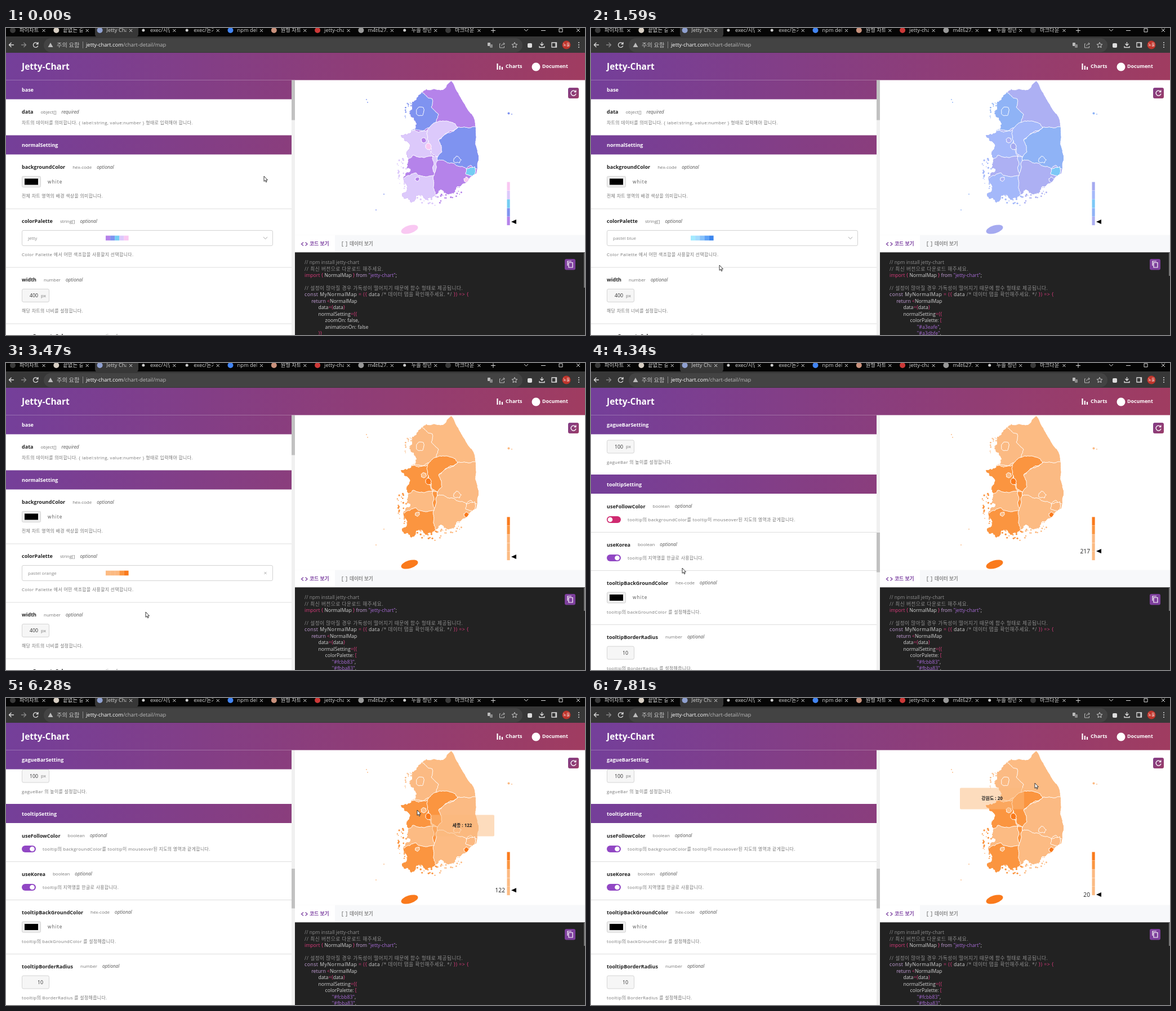
Recreate the animation shown at these times as an HTML page with a canvas. Size 1028 by 545 pixels, loop 8000 ms.

```html
<!DOCTYPE html>
<html lang="ko">
<head>
<meta charset="utf-8">
<title>Jetty-Chart</title>
<style>
html, body { margin: 0; width: 100%; height: 100%; overflow: hidden; background: #fff; }
canvas { display: block; }
</style>
</head>
<body>
<canvas id="stage" width="1028" height="545"></canvas>
<script>
const ctx = document.getElementById('stage').getContext('2d');
const LOOP = 8000;
const FONT = "'Open Sans', 'Noto Sans CJK KR', 'Noto Sans CJK', sans-serif";

// ---------- drawing helpers ----------
function text(str, x, y, size, color, style = '', spacing = 0, align = 'left') {
  ctx.font = `${style} ${size}px ${FONT}`;
  ctx.letterSpacing = spacing + 'px';
  ctx.textAlign = align;
  ctx.fillStyle = color;
  ctx.fillText(str, x, y + size * 0.36);
  return ctx.measureText(str).width;
}
function rect(x, y, w, h, fill, radius = 0, border) {
  ctx.beginPath();
  ctx.roundRect(x, y, w, h, radius);
  ctx.fillStyle = fill;
  ctx.fill();
  if (border) { ctx.strokeStyle = border; ctx.lineWidth = 1; ctx.stroke(); }
}
function circle(x, y, r, fill) {
  ctx.beginPath();
  ctx.arc(x, y, r, 0, 7);
  ctx.fillStyle = fill;
  ctx.fill();
}
function line(path, color, width = 1) {
  ctx.strokeStyle = color;
  ctx.lineWidth = width;
  ctx.stroke(new Path2D(path));
}
function shape(path, fill) {
  ctx.fillStyle = fill;
  ctx.fill(new Path2D(path));
}
function clipped(path, draw) {
  ctx.save();
  ctx.clip(new Path2D(path));
  draw();
  ctx.restore();
}
function gradient(x0, y0, x1, y1) {
  const g = ctx.createLinearGradient(x0, y0, x1, y1);
  g.addColorStop(0, '#743f9a');
  g.addColorStop(1, '#a03c60');
  return g;
}
const brand = gradient(0, 50, 1028, 150);
const clamp = v => Math.max(0, Math.min(1, v));
const smooth = v => (v = clamp(v), v * v * (3 - 2 * v));
const latest = (list, t) => list.findLast(item => item.at <= t);

// ---------- timeline ----------
const MOVE_TIME = 260, FADE = 320;
const PAGE_JUMP = 3980, SCROLL_AT = 4360, TOGGLE_AT = 4960;
const MOVES = [
  { at: -MOVE_TIME, to: [458, 263], value: 85 },
  { at: 100, to: [320, 368] },
  { at: 670, to: [211, 399] },
  { at: 1100, to: [228, 421] },
  { at: 1700, to: [262, 368] },
  { at: 2300, to: [255, 424] },
  { at: 2650, to: [248, 442] },
  { at: 3940, to: [162, 364], value: 217 },
  { at: 4700, to: [42, 264] },
  { at: 5150, to: [790, 200], place: '경상북도', value: 87 },
  { at: 5700, to: [730, 199], place: '세종', value: 122 },
  { at: 6440, to: [727, 201], place: '충청남도', value: 590 },
  { at: 6950, to: [770, 108], place: '경기도', value: 200 },
  { at: 7500, to: [788, 151], place: '강원도', value: 20 }
];
const PICKS = [{ at: 0, palette: 0 }, { at: 1450, palette: 1 }, { at: 3070, palette: 2 }];
const isOpen = t => (t > 760 && t < 1590) || (t > 2270 && t < 3130);

function cursorAt(t) {
  const i = MOVES.findLastIndex(move => move.at <= t);
  const from = MOVES[Math.max(0, i - 1)].to, k = smooth((t - MOVES[i].at) / MOVE_TIME);
  return MOVES[i].to.map((v, axis) => from[axis] + (v - from[axis]) * k);
}
const scrollAt = t => 10 * clamp((t - SCROLL_AT) / 190);

// ---------- palettes ----------
function mix(a, b, k) {
  const channel = (hex, i) => parseInt(hex.slice(i, i + 2), 16);
  return `rgb(${[1, 3, 5].map(i => channel(a, i) * (1 - k) + channel(b, i) * k)})`;
}
const ramp = (a, b) => Array.from({ length: 5 }, (_, i) => mix(a, b, i / 4));
const PALETTES = [
  { name: 'jetty', colors: ['#b583ea', '#7f93f0', '#74cdf3', '#dcc9fb', '#f9c8f2'] },
  { name: 'pastel blue', colors: ['#a3eafe', '#a3dbfe', '#86c1fb', '#5ea3f8', '#3b85ee'] },
  { name: 'pastel orange', colors: ['#fcbb83', '#fbba83', '#fcb981', '#fb9540', '#fa7a1c'] },
  { name: 'pastel vermilion', colors: ramp('#fbe6dc', '#ea4335') },
  { name: 'lightgrey', colors: ramp('#f5f7f8', '#64748b') },
  { name: 'pastel green', colors: ramp('#d5f5ec', '#2fc46f') }
];
function mapColors(t) {
  const { at, palette } = latest(PICKS, t);
  const before = PALETTES[Math.max(0, palette - 1)].colors;
  return PALETTES[palette].colors.map((c, i) => mix(before[i], c, clamp((t - at) / FADE)));
}
function swatches(palette, x, y) {
  palette.colors.forEach((c, i) => rect(x + i * 8.1, y - 4.3, 8.2, 8.6, c));
}

// ---------- map ----------
const noise = (x, y) => {
  const s = Math.sin(x * 12.9898 + y * 78.233) * 43758.5453;
  return s - Math.floor(s) - 0.5;
};
const points = list => list.split(' ').map(p => p.split(',').map(Number));

// Midpoint displacement turns a few key points into a ragged border.
function ragged(keys, roughness) {
  const out = [];
  const split = (a, b) => {
    const dx = b[0] - a[0], dy = b[1] - a[1];
    if (Math.hypot(dx, dy) < 2.5) return out.push(a);
    const mx = (a[0] + b[0]) / 2, my = (a[1] + b[1]) / 2;
    const k = noise(mx, my) * roughness(mx, my);
    const mid = [mx - dy * k, my + dx * k];
    split(a, mid);
    split(mid, b);
  };
  keys.forEach((p, i) => split(p, keys[(i + 1) % keys.length]));
  return 'M' + out.join('L') + 'Z';
}
const blob = (x, y, r) => Array.from({ length: 7 }, (_, i) => {
  const radius = r * (1 + noise(x + i, y) * 0.5), angle = i * Math.PI * 2 / 7;
  return [x + radius * Math.cos(angle), y + radius * Math.sin(angle)];
});
// The east coast is smooth, the west and south coasts are ragged.
const coastRoughness = (x, y) => 0.15 + 0.5 * clamp((790 - x + Math.max(0, y - 260) * 3) / 70);
const inland = () => 0.3;

const COAST = ragged(points('790,94 806,122 830,158 834,190 833,206 839,228 835,258 824,265 816,275 803,281 797,291 ' +
  '768,289 740,298 718,309 706,302 713,284 706,272 718,254 712,242 716,214 701,190 720,181 727,165 721,140 738,114 776,110'),
  coastRoughness);
// Gangwon is the ground colour; provinces are painted over it and cut off at the coast.
const PROVINCES = [
  { level: 3, keys: points('680,230 768,230 768,330 680,330') },
  { level: 0, keys: points('680,210 766,210 764,262 740,263 728,257 680,264') },
  { level: 0, keys: points('766,225 860,225 860,310 766,310 760,262') },
  { level: 1, keys: points('803,176 860,190 860,246 826,244 817,250 795,240 766,235 768,199 785,186') },
  { level: 3, keys: points('680,181 750,181 758,228 722,226 680,240') },
  { level: 1, keys: points('700,100 738,113 757,126 755,140 768,154 764,166 742,182 700,178') },
  { level: 3, keys: points('748,182 757,171 790,167 802,176 777,191 768,199 774,220 766,229 757,224') },
  { level: 1, keys: blob(735, 149, 8) },
  { level: 0, keys: blob(742, 200, 5) },
  { level: 4, keys: blob(750, 210, 6) },
  { level: 1, keys: blob(801, 234, 6) },
  { level: 2, keys: blob(826, 254, 9) },
  { level: 4, keys: blob(818, 270, 5) },
  { level: 0, keys: blob(731, 268, 4) }
].map(({ level, keys }) => ({ level, path: new Path2D(ragged(keys, inland)) }));

function drawIslands(colors) {
  for (let i = 0; i < 80; i++) {
    const angle = Math.PI * (0.2 + 0.9 * i / 80), radius = 58 + noise(i, 3) * 18;
    const x = 760 + radius * Math.cos(angle), y = 248 + radius * Math.sin(angle);
    circle(x, y, 1.2 + noise(i, 5), colors[x > 766 ? 0 : 3]);
  }
  for (let i = 0; i < 14; i++)
    circle(714 + noise(i, 7) * 12, 146 + noise(i, 8) * 28, 1 + noise(i, 9), colors[1]);
  for (const [x, y] of points('640,127 642,132 898,153 671,295 657,323')) circle(x, y, 0.9, colors[1]);
  circle(892.5, 151.5, 2, colors[1]);
  ctx.beginPath();
  ctx.ellipse(716.5, 357.5, 15.5, 7, -0.3, 0, 7);
  ctx.fillStyle = colors[4];
  ctx.fill();
}
function drawMap(t) {
  const colors = mapColors(t);
  drawIslands(colors);
  clipped(COAST, () => {
    rect(680, 90, 180, 230, colors[0]);
    for (const { level, path } of PROVINCES) {
      ctx.fillStyle = colors[level];
      ctx.fill(path);
      ctx.strokeStyle = '#fff';
      ctx.lineWidth = 1;
      ctx.stroke(path);
    }
  });
  colors.forEach((c, i) => rect(889.5, 335 - i * 15.4, 5.2, 15.1, c));
  drawHover(t);
}
function drawHover(t) {
  const { at, place, value } = latest(MOVES.filter(move => move.value), t - MOVE_TIME);
  const y = 350.5 - value * 0.076;
  shape(`M897 ${y}l9 -4v8z`, '#000');
  if (at > 0) text(value, 886, y, 10.2, '#222', '', 0, 'right');
  if (!place) return;
  const [cx, cy] = cursorAt(t);
  const x = cx < 765 ? cx + 23 : cx - 133, top = cy + 8.5;
  rect(x, top, 114, 38, 'rgba(251,186,125,.5)', 2);
  text(`${place} : ${value}`, x + 57, top + 19, 8, '#222', 'bold', 0, 'center');
}

// ---------- browser bar ----------
const TABS = [
  ['#3a3a3a', '파이차트'], ['#d8cfc4', '끝없는 길'], ['#8fa0d0', 'Jetty Char'], ['#ccc', 'exec/시연'],
  ['#ccc', 'exec/돈가'], ['#4285f4', 'npm deb'], ['#c9917c', '원형 차트'], ['#cb3837', 'jetty-char'],
  ['#999', 'm4t627.p'], ['#ccc', '누솔 청년'], ['#3a3a3a', '마크다운']
];
function drawBrowser() {
  rect(0, 0, 1028, 44, '#373737');
  rect(0, 0, 1028, 15, '#050505');
  rect(158, -6, 77, 22, '#373737', 5);
  TABS.forEach(([color, title], i) => {
    const x = 12 + i * 77.3;
    circle(x, 4, color === '#ccc' ? 2.5 : 5, color);
    clipped(`M${x + 11} 0h36v14h-36z`, () => text(title, x + 12, 4, 9.3, '#d6d6d6'));
    line(`M${x + 52.5} 2l5 5m0 -5l-5 5`, '#ddd');
  });
  line('M861 4.5h8m-4 -4v8M920 2l3.5 3.5 3.5 -3.5M950 4.5h8M982 1h6v6h-6zM1013 1l6 6m0 -6l-6 6', '#ddd');
  line('M14 30H5.5m4 -4l-4 4 4 4', '#ddd', 1.3);
  line('M27 30h8.5m-4 -4l4 4 -4 4', '#888', 1.3);
  line('M56.5 28a4.3 4.3 0 1 0 .3 3.5M57 25v3.5h-3.5', '#ddd', 1.3);
  rect(67, 18, 850, 25, '#434343', 12.5);
  shape('M79 26l4.5 8h-9z', '#bbb');
  text('주의 요함', 90, 30, 10.3, '#c4c4c4');
  rect(136, 24, 1, 12, '#888');
  const w = text('jetty-chart.com', 142, 30, 9.4, '#fff');
  text('/chart-detail/map', 142 + w, 30, 9.4, '#bbb');
  rect(855, 26, 5, 6, '#bbb', 1);
  rect(859, 29, 5, 6, '#888', 1);
  line('M878 28h-1.5v7h8v-3M880 32q0 -4 5 -4m-2 -2l2.5 2 -2.5 2', '#bbb');
  line('M903 25.5l1.4 3.2 3.4 .3 -2.6 2.3 .8 3.4 -3 -1.8 -3 1.8 .8 -3.4 -2.6 -2.3 3.4 -.3z', '#ccc');
  rect(926, 27, 8, 8, '#ddd', 2);
  line('M951.5 25v6m-3 -3l3 3 3 -3M947 32v2.5h9v-2.5M969 26h8.5v8h-8.5zM976 26v8', '#ddd', 1.3);
  circle(995, 30, 7.5, '#c0352c');
  text('노을', 995, 30, 6.5, '#fff', '', 0, 'center');
  for (let y = 26; y <= 34; y += 4) circle(1017, y, 1, '#ddd');
}
function drawHeader() {
  rect(0, 44, 1028, 48.4, brand);
  text('Jetty-Chart', 28, 68, 15.5, '#fff', 'bold');
  line('M872.5 63v11M876.8 67v7M881 69v5', '#fff', 2.2);
  text('Charts', 887, 68, 9, '#fff', 'bold');
  circle(941, 69, 7.5, '#fff');
  text('Document', 952, 68, 8.8, '#fff', 'bold');
}

// ---------- settings panel ----------
const BAR = 34;
function sectionBar(y, title) {
  rect(0, y, 507, BAR, brand);
  text(title, 28, y + 17.5, 9, '#fff', 'bold');
}
// Each control has a height and draws itself around a centre line.
const CONTROLS = {
  none: { height: -12, draw() {} },
  color: { height: 20, draw(y) {
    rect(28.5, y - 9.5, 33, 19, '#efefef', 2, '#d2d2d2');
    rect(33, y - 5.5, 24, 11, '#000');
    text('white', 74, y, 8.2, '#555', '', 1.1);
  } },
  number: { height: 24, draw(y, t, { value, unit = '' }) {
    rect(28.5, y - 11.5, 48, 23, '#f6f6f6', 2.5, '#d4d4d4');
    text(value, unit ? 57 : 66, y, 8.8, '#333', '', 0, 'right');
    text(unit, 62, y, 8, '#777');
  } },
  select: { height: 28, draw(y, t) {
    const palette = PALETTES[latest(PICKS, t).palette];
    rect(28.5, y - 13.5, 445, 27, '#fff', 2.5, '#d2d2d2');
    text(palette.name, 39, y, 8, '#888');
    swatches(palette, 177, y);
    const clearing = t > 3200 && t < 3620;
    line(clearing ? `M458.5 ${y - 2}l4 4m0 -4l-4 4`
      : isOpen(t) ? `M457 ${y + 2}l3.5 -4 3.5 4` : `M457 ${y - 2}l3.5 4 3.5 -4`, '#aaa');
  } },
  toggle: { height: -8, inline: true, draw(y, t, { since }) {
    const k = clamp((t - since) / 150);
    rect(28, y - 6, 25, 12, mix('#cf2a70', '#9147c4', k), 6);
    circle(34 + 12.5 * k, y, 4.3, '#fff');
  } }
};
const TOP_PAGE = [
  { section: 'base' },
  { name: 'data', type: 'object[]', need: 'required', control: 'none',
    note: '차트의 데이터를 의미합니다. { label:string, value:number } 형태로 입력해야 합니다.' },
  { section: 'normalSetting' },
  { name: 'backgroundColor', type: 'hex-code', control: 'color', note: '전체 차트 영역의 배경 색상을 의미합니다.' },
  { name: 'colorPalette', type: 'string[]', control: 'select', note: 'Color Pallette 에서 어떤 색조합을 사용할지 선택합니다.' },
  { name: 'width', type: 'number', control: 'number', value: 400, unit: 'px', note: '해당 차트의 너비를 설정합니다.' },
  { name: 'mapPropertyColor', type: 'hex-code', control: 'color', note: '' }
];
const TOOLTIP_PAGE = [
  { control: 'number', value: 100, unit: 'px', note: 'gagueBar 의 높이를 설정합니다.' },
  { section: 'tooltipSetting' },
  { name: 'useFollowColor', type: 'boolean', control: 'toggle', since: TOGGLE_AT,
    note: 'tooltip의 backgroundColor를 tooltip이 mouseover된 지도의 영역과 같게합니다.' },
  { name: 'useKorea', type: 'boolean', control: 'toggle', since: -LOOP, note: 'tooltip의 지역명을 한글로 사용합니다.' },
  { name: 'tooltipBackGroundColor', type: 'hex-code', control: 'color', note: 'tooltip의 backGroundColor 를 설정해줍니다.' },
  { name: 'tooltipBorderRadius', type: 'number', control: 'number', value: 10, note: 'tooltip의 BorderRadius 를 설정해줍니다.' }
];
function optionTitle(y, { name, type, need = 'optional' }) {
  let x = 28 + text(name, 28, y, 9, '#222', 'bold') + 13;
  x += text(type, x, y, 8, '#777') + 9;
  text(need, x, y, 8.3, '#555', 'italic');
}
function drawRows(rows, y, t) {
  for (const row of rows) {
    if (row.section) {
      sectionBar(y, row.section);
      y += BAR;
      continue;
    }
    const { height, inline, draw } = CONTROLS[row.control];
    const noteY = y + height + 54;
    if (row.name) optionTitle(y + 22.3, row);
    draw(inline ? noteY : y + 38.5 + height / 2, t, row);
    text(row.note, inline ? 65 : 28, noteY, 7.9, '#777', '', 0.36);
    y += height + 76;
    rect(0, y, 507, 1, '#dedede');
  }
}
function drawPanel(t, onTop) {
  clipped('M0 92h507v453H0z', () => {
    if (onTop) return drawRows(TOP_PAGE, 92.4, t);
    drawRows(TOOLTIP_PAGE, 98 - scrollAt(t), t);
    sectionBar(92.6, 'gagueBarSetting');
  });
  rect(507, 92.4, 6, 453, '#f0f0f0');
  rect(507, onTop ? 93 : 301 + scrollAt(t) / 5, 6, 70.5, '#c1c1c1');
}
function drawDropdown(cursorY) {
  const rowHeight = 21.65;
  ctx.save();
  ctx.shadowColor = 'rgba(0,0,0,.35)';
  ctx.shadowBlur = 5;
  ctx.shadowOffsetY = 1;
  rect(28, 388.5, 446, 137, '#fff', 2);
  ctx.restore();
  const hovered = Math.floor((cursorY - 393) / rowHeight);
  PALETTES.forEach((palette, i) => {
    const y = 403.7 + i * rowHeight, hover = i === hovered;
    if (hover) rect(28, y - rowHeight / 2, 441, rowHeight, i ? '#dedede' : '#cfcfcf');
    text(palette.name, 39, y, 8, !hover ? '#333' : i ? '#888' : '#bdbdbd');
    swatches(palette, 175, y);
  });
  rect(469, 390, 5, 36, '#bcbcbc', 2);
}

// ---------- code panel ----------
const TOKEN = /(\/\/.*|\/\*.*?\*\/)|("[^"]*")|(\bimport\b|=>|[{}()\[\]<=]+)|(\b(?:from|const|return)\b)|([^"{}()\[\]<=\/ ]+|\s+|.)/g;
const TOKEN_COLORS = ['', '#8e8e8e', '#a76bd6', '#d93a7b', '#c8a2dc', '#d4d4d4'];
function codeLine(str, row) {
  const spacing = /[가-힣]/.test(str) ? 0.5 : 0;
  const body = str.trimStart();
  let x = 530 + (str.length - body.length) * 12.2;
  for (const m of body.matchAll(TOKEN)) {
    const kind = m.findIndex((group, i) => i && group !== undefined);
    x += text(m[0], x, 416 + row * 11.47, 8.7, TOKEN_COLORS[kind], '', spacing);
  }
}
function drawCode(t) {
  const { palette } = latest(PICKS, t);
  const settings = palette
    ? ['   colorPalette: [', ...PALETTES[palette].colors.slice(0, 2).map(c => `    "${c}",`)]
    : ['   zoomOn: false,', '   animationOn: false', '  }}'];
  rect(513, 367.5, 515, 31.5, '#f7f8fa');
  rect(513, 367.5, 71, 31.5, '#fff');
  line('M528 380.5l-3.5 3 3.5 3M531.5 380.5l3.5 3 -3.5 3', '#7b3fa0', 1.3);
  text('코드 보기', 539, 383, 8.8, '#7b3fa0', 'bold');
  line('M599 379.5h-2v8h2M603 379.5h2v8h-2', '#888', 1.1);
  text('데이터 보기', 610, 383, 8.6, '#888', 'bold');
  rect(513, 398.3, 515, 147, '#222');
  [
    '// npm install jetty-chart', '// 최신 버전으로 다운로드 해주세요.', 'import { NormalMap } from "jetty-chart";', '',
    '// 설정이 많아질 경우 가독성이 떨어지기 때문에 함수 형태로 제공됩니다.',
    'const MyNormalMap = ({ data /* 데이터 탭을 확인해주세요. */ }) => {',
    ' return <NormalMap', '  data={data}', '  normalSetting={{', ...settings
  ].forEach(codeLine);
  rect(1026, 399, 2, palette ? 41 : 62, '#777');
  rect(992, 410, 19, 19.5, '#7d3f9c', 3);
  line('M999 416.5h7v8.5h-7zM997 422v-8h7', '#fff', 1.2);
}

function drawCursor(x, y, hand) {
  ctx.save();
  ctx.translate(x, y);
  ctx.lineJoin = 'round';
  const outline = hand
    ? 'M-1.5 1q1.3 -1.6 2.4 0v4.2l4 .9q1.4 .5 1 2l-1 4.9h-5.4l-3.5 -4.8q.4 -1.6 2.5 0z'
    : 'M0 0v9.3l2.1 -1.9 1.5 3.3 1.5 -.7 -1.5 -3.1h2.9z';
  shape(outline, '#fff');
  line(outline, '#222', 0.9);
  ctx.restore();
}

function draw(t) {
  const [x, y] = cursorAt(t);
  const onTop = t < PAGE_JUMP;
  rect(0, 0, 1028, 545, '#fff');
  drawPanel(t, onTop);
  drawMap(t);
  rect(998, 106, 19, 19, gradient(985, 100, 1022, 128), 3);
  line('M1011 112.6a4.5 4.5 0 1 0 1 4M1011.8 110.5v3h-3', '#fff', 1.3);
  drawCode(t);
  drawBrowser();
  drawHeader();
  if (isOpen(t)) drawDropdown(y);
  const overSelect = onTop && x < 474 && y > 360 && y < 387;
  const overToggle = !onTop && x < 53;
  drawCursor(x, y, isOpen(t) || overSelect || overToggle);
}

const start = performance.now();
function frame(now) {
  draw(Math.max(0, now - start) % LOOP);
  requestAnimationFrame(frame);
}
frame(start);
</script>
</body>
</html>
```
